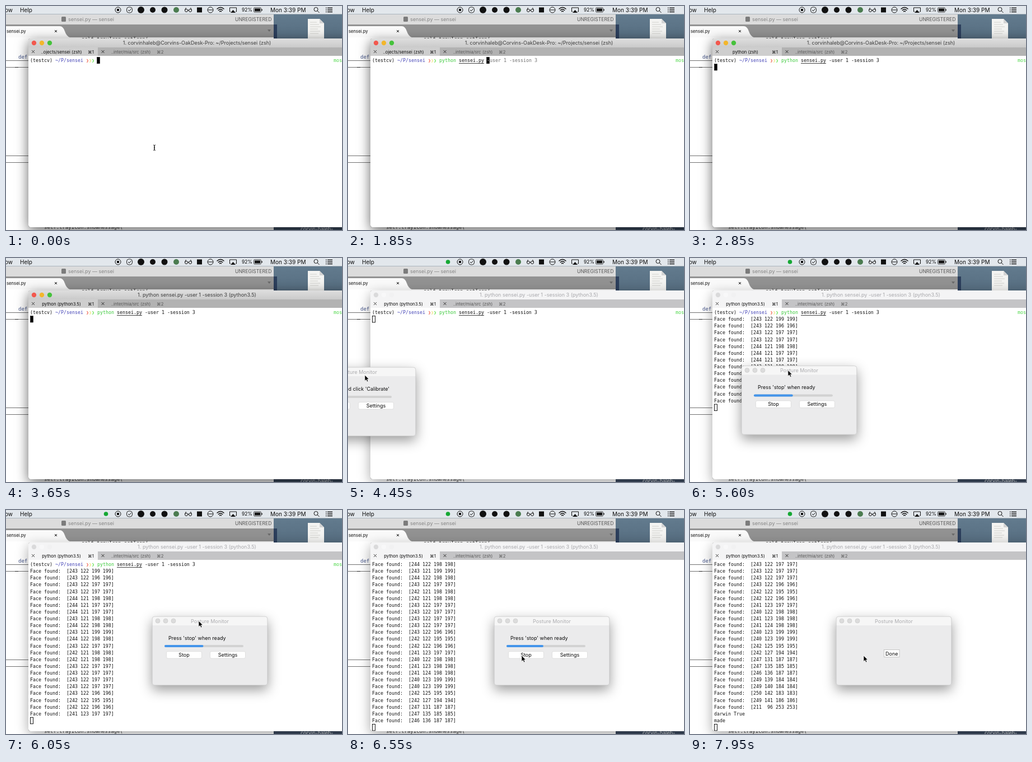
Write an HTML page that moves like this. It is 600 by 400 pixels and loops after 8000 ms.

```html
<!DOCTYPE html>
<html lang="en">
<head>
<meta charset="utf-8">
<title>Terminal session</title>
<style>
html, body { margin: 0; width: 100%; height: 100%; overflow: hidden; }
svg { display: block; width: 600px; height: 400px; }
text { font-family: Inter, "DejaVu Sans", sans-serif; font-size: 9px; fill: #0c0c0c; white-space: pre; }
.mono { font-family: "DejaVu Sans Mono", monospace; font-size: 8.3px; fill: #141414; }
.code { font-family: "DejaVu Sans Mono", monospace; font-size: 9px; fill: #3c3c3c; }
.menu { font-size: 10px; }
.tab { font-size: 7.7px; }
.mid { text-anchor: middle; }
.line { fill: none; stroke: #111; }
</style>
</head>
<body>
<svg viewBox="0 0 600 400">
  <defs>
    <linearGradient id="bar" x2="0" y2="1">
      <stop stop-color="#dedede"/><stop offset="1" stop-color="#cacaca"/>
    </linearGradient>
    <linearGradient id="sky" x2="0" y2="1">
      <stop stop-color="#667f92"/><stop offset="1" stop-color="#566d80"/>
    </linearGradient>
  </defs>

  <rect width="600" height="60" fill="url(#sky)"/>
  <rect x="478" y="33" width="6" height="27" fill="#2c3f5c"/>
  <rect x="478" y="360" width="122" height="40" fill="#3c4b60"/>
  <path d="M539 23h21l8 8v40h-29z" fill="#f4f4f2"/>
  <path d="M560 23v8h8" fill="#d4d4d4"/>
  <path d="M543 29h12M543 33h16M543 37h19M543 41h14M543 45h18M543 49h15" stroke="#d0d0cc"/>
  <text x="555" y="401" class="mid" style="fill:#f0f0f0">corvin-haleb-</text>

  <g id="editor">
    <rect y="15" width="478" height="385" fill="#fff"/>
    <rect y="15" width="478" height="18" fill="#dcdcdc"/>
    <rect y="33" width="478" height="23" fill="#929292"/>
    <path d="M0 36H96Q102 36 105 45T114 56H0z" fill="#fafafa"/>
    <rect x="99" y="19" width="8" height="9" rx="1.5" fill="#7c7c7c"/>
    <text x="111" y="27" style="fill:#858585">sensei.py — sensei</text>
    <text x="409" y="27" style="font-size:8.6px;fill:#555">UNREGISTERED</text>
    <text x="1" y="48" class="tab">sensei.py</text>
    <path d="M87 43l4 4m0-4l-4 4" class="line"/>
    <path d="M467 42h6l-3 4z" fill="#6a6a6a"/>
    <text x="22" y="94" class="code" style="fill:#445488">def</text>
    <path d="M0 97.5H60M0 109.5H60M0 267.5H60M0 279.5H60" stroke="#707070"/>
    <path d="M16 109.5h6" stroke="#222"/>
    <text x="135" y="62" class="code">self.trayIcon.setIcon(</text>
    <text x="68" y="398" class="code">self.trayIcon.showMessage(</text>
  </g>

  <rect id="termShadow" x="40" y="58" width="580" height="337" rx="4"/>
  <g id="terminal">
    <rect x="40" y="58" width="580" height="337" rx="4" fill="#fff"/>
    <path id="titleBar" d="M40 74V62q0-4 4-4H600V74z"/>
    <rect id="tabRow" x="40" y="74" width="560" height="15"/>
    <rect id="activeTab" x="40" y="74" width="124" height="15"/>
    <g id="lights">
      <circle cx="50" cy="66" r="4.2" fill="#f2584e"/>
      <circle cx="64" cy="66" r="4.2" fill="#f3b62c"/>
      <circle cx="78" cy="66" r="4.2" fill="#46c23c"/>
    </g>
    <text id="termTitle" x="341" y="69" class="mid"></text>
    <path d="M46 79l5 5m0-5l-5 5M170.5 79l5 5m0-5l-5 5" class="line" stroke-width=".8"/>
    <text id="tabTitle" x="99" y="84.5" class="tab mid"></text>
    <text x="146" y="84.5" class="tab">⌘1</text>
    <text x="223" y="84.5" class="tab mid" style="fill:#555">..inter/mia/src (zsh)</text>
    <text x="269" y="84.5" class="tab" style="fill:#555">⌘2</text>

    <g id="prompt">
      <text x="43" y="100" class="mono">(testcv)</text>
      <text x="88" y="100" class="mono" style="fill:#4848b8">~/P/sensei</text>
      <text x="143" y="100" class="mono" style="fill:#f0604c">❯</text>
      <text x="148" y="100" class="mono" style="fill:#f0e47c">❯</text>
      <text x="153" y="100" class="mono" style="fill:#5ce04a">❯</text>
      <text x="585" y="100" class="mono" style="fill:#4fd84a">mos</text>
      <text id="word" x="163" y="100" class="mono"></text>
      <text id="args" x="193" y="100" class="mono"></text>
      <text id="hint" y="100" class="mono" style="fill:#707070"></text>
      <path id="underline" d="M198 102.5h45" stroke="#141414" stroke-width=".8"/>
    </g>
    <g id="rows"></g>
    <rect id="caret" width="5" height="11.5" stroke="#000"/>
    <text id="caretChar" y="100" class="mono" style="fill:#fff"></text>
  </g>

  <g id="dialog">
    <rect width="206" height="123" rx="4" fill="#ebebec" style="filter:drop-shadow(0 8px 11px rgba(0,0,0,.4))"/>
    <path d="M0 16V4q0-4 4-4H202q4 0 4 4V16z" fill="#f6f6f6"/>
    <rect x=".2" y=".2" width="205.6" height="122.6" rx="4" fill="none" stroke="#bcbcbc" stroke-width=".6"/>
    <g fill="#dcdcdc" stroke="#c6c6c6" stroke-width=".6">
      <circle cx="10" cy="8" r="4"/><circle cx="24" cy="8" r="4"/><circle cx="38" cy="8" r="4"/>
    </g>
    <text x="103" y="11.5" class="mid" style="fill:#adadb0">Posture Monitor</text>
    <g id="controls">
      <text id="label" x="29" y="42"></text>
      <rect x="22" y="51" width="141" height="4" rx="2" fill="#d2d2d2"/>
      <rect id="progress" x="22" y="51" height="4" rx="2" fill="#4495ea"/>
      <g fill="#fff" stroke="#d0d0d0" stroke-width=".6">
        <rect x="25.5" y="62.5" width="63" height="12.5" rx="2.5"/>
        <rect x="103.5" y="62.5" width="63" height="12.5" rx="2.5"/>
      </g>
      <text id="action" x="57" y="72" class="mid"></text>
      <text x="135" y="72" class="mid">Settings</text>
    </g>
    <g id="done">
      <rect x="85.5" y="59.5" width="27.5" height="13" fill="#fff" stroke="#bbb" stroke-width=".8"/>
      <text x="99.3" y="69.5" class="mid">Done</text>
    </g>
  </g>

  <g id="menuBar">
    <rect width="600" height="14.5" fill="#e2e7ec"/>
    <path d="M0 14.5H600" stroke="#b4bac0" stroke-width=".6"/>
    <text x="12" y="10.5" class="menu" text-anchor="end">Window</text>
    <text x="25" y="10.5" class="menu">Help</text>
    <circle id="camera" cx="178.5" cy="7" r="3.8" fill="#16a834"/>
    <g class="line">
      <circle cx="200" cy="7" r="5"/>
      <rect x="215.5" y="2" width="10" height="10" rx="4" stroke-width=".9"/>
      <path d="M218 7l2 2 3.5-4"/>
      <circle cx="322" cy="8" r="2.5"/><circle cx="329" cy="8" r="2.5"/>
      <path d="M324.5 7.5h2M319.5 7l2-4M331.5 7l-2-4"/>
      <circle cx="365" cy="7" r="5"/><path d="M360.5 7h9"/>
      <path d="M376.5 5.5q6.5-6 13 0M378.8 8q4.2-4 8.4 0M381 10.2q2-2 4 0" stroke-width="1.4"/>
      <path d="M401 10h-1.5V3h12v7H410"/>
      <rect x="442.5" y="3" width="13" height="8" rx="1.5" stroke-width=".8"/>
      <circle cx="553.5" cy="6" r="3.5"/><path d="M556 8.5l3.5 3.5"/>
      <path d="M574 3.5h9M574 7h9M574 10.5h9M571 3.5h1.5M571 7h1.5M571 10.5h1.5" stroke-width="1.3"/>
    </g>
    <g fill="#111">
      <rect x="198" y="5" width="4" height="4"/>
      <circle cx="241" cy="7" r="6"/>
      <circle cx="262" cy="7" r="5"/>
      <circle cx="283" cy="7" r="5.5"/>
      <circle cx="304" cy="7" r="5" fill="#4b7c50"/>
      <rect x="341" y="2.5" width="9" height="9"/>
      <path d="M405.5 7l4.5 5h-9z"/>
      <rect x="444" y="4.5" width="10" height="5"/><rect x="456.5" y="5.5" width="1.3" height="3"/>
    </g>
    <text x="421" y="10" style="font-size:8.5px">92%</text>
    <text x="472" y="10.5" class="menu">Mon 3:39 PM</text>
  </g>

  <path id="beam" d="M263 248q2 0 2 2v6q0 2-2 2M267 248q-2 0-2 2v6q0 2 2 2M264 253h2" class="line" stroke-width=".9"/>
  <path id="mouse" d="M0 0V10.5L2.5 8.3 4.2 12 6 11.2 4.4 7.6H7.5z" fill="#000" stroke="#fff" stroke-width=".7"/>
</svg>

<script>
const LOOP = 8000, ROWS = 25, PITCH = 12.13, CHAR = 5;
const COMMAND = "python sensei.py -user 1 -session 3";
const AT = { type: 350, accept: 2200, enter: 2700, python: 3150, window: 4000,
  calibrate: 4850, faces: 4925, stop: 6800, warning: 7750 };

// x, y and size of each face found while calibrating
const FACES = `243 122 199,243 122 196,243 122 197,243 122 197,244 121 198,244 121 197,244 121 197,243 121 198,
244 122 198,243 121 199,244 122 198,243 122 197,242 121 198,242 121 198,243 122 197,243 122 197,243 122 197,
243 122 197,243 122 196,242 122 195,242 122 196,241 123 197,240 122 198,241 123 198,241 124 198,240 123 199,
240 123 199,242 125 195,242 127 194,247 131 187,247 135 185,246 136 187,249 139 184,249 140 184,250 142 183,
249 141 186`.split(",").map(s => s.trim());
const size = face => face.slice(-3);
const report = face => `Face found:  [${face} ${size(face)}]`;
const LINES = FACES.map(report);
const WARNING = [report("211  96 253"), "darwin True", "made"];

// time, x, y
const MOUSE = [[4100, 265, 253], [4450, 30, 209], [4700, -30, 262], [4900, -30, 262],
  [5150, -2, 203], [5200, -2, 203], [5990, 344, 198], [6080, 344, 198], [6450, 310, 260]];
const DIALOG = [[5200, -85, 195], [5990, 261, 190]];

const el = {};
document.querySelectorAll("[id]").forEach(e => el[e.id] = e);
const show = (e, on) => e.style.display = on ? "" : "none";
const write = (e, s) => { if (e.textContent !== s) e.textContent = s; };
const set = (e, attrs) => { for (const k in attrs) e.setAttribute(k, attrs[k]); };
const move = (e, [x, y]) => set(e, { transform: `translate(${x} ${y})` });
const clamp = (v, lo, hi) => Math.min(hi, Math.max(lo, v));

function along(path, t) {
  const i = path.findIndex(p => p[0] > t);
  if (i === 0) return path[0].slice(1);
  if (i < 0) return path[path.length - 1].slice(1);
  const [a, b] = [path[i - 1], path[i]];
  const u = (t - a[0]) / (b[0] - a[0]), e = u * u * (3 - 2 * u);
  return [1, 2].map(k => a[k] + (b[k] - a[k]) * e);
}

const rows = Array.from({ length: ROWS }, (_, i) => {
  const row = document.createElementNS("http://www.w3.org/2000/svg", "text");
  set(row, { class: "mono", x: 43, y: 100 + i * PITCH });
  return el.rows.appendChild(row);
});

function drawTerminal(t, front) {
  write(el.tabTitle, t < AT.enter ? "..ojects/sensei (zsh)" : t < AT.python ? "python (zsh)" : "python (python3.5)");
  write(el.termTitle, t < AT.python ? "1. corvinhaleb@Corvins-OakDesk-Pro: ~/Projects/sensei (zsh)"
    : "1. python sensei.py -user 1 -session 3 (python3.5)");
  el.termTitle.style.fill = front ? "#3c3c3c" : "#a8a8ac";
  set(el.titleBar, { fill: front ? "url(#bar)" : "#f4f4f5" });
  set(el.tabRow, { fill: front ? "#b2b2b2" : "#c4c4c6" });
  set(el.activeTab, { fill: front ? "#cecece" : "#f4f4f5" });
  el.lights.style.filter = front ? "" : "grayscale(1) brightness(1.5) opacity(.4)";
  el.termShadow.style.filter = `drop-shadow(0 6px 11px rgba(0,0,0,${front ? .6 : .35}))`;
}

function drawCommand(t) {
  const typed = t >= AT.accept ? COMMAND.length : clamp(Math.floor((t - AT.type) / 85), 0, 17);
  write(el.word, COMMAND.slice(0, Math.min(6, typed)));
  el.word.style.fill = typed < 6 ? "#e0503c" : "#3cc93c";
  write(el.args, COMMAND.slice(6, Math.max(6, typed)));
  write(el.hint, typed ? COMMAND.slice(typed + 1) : "");
  set(el.hint, { x: 163 + CHAR * (typed + 1) });
  show(el.underline, typed >= 16);
  return typed;
}

function drawOutput(t, typed, front) {
  const count = clamp(Math.floor((t - AT.faces) / 50), 0, FACES.length);
  const out = LINES.slice(0, count);
  if (t >= AT.warning) out.push(...WARNING);
  const entered = t >= AT.enter;
  const scroll = Math.max(0, out.length + 2 - ROWS);
  rows.forEach((row, i) => write(row, out[i + scroll - 1] || ""));
  show(el.prompt, !scroll);
  const caretRow = entered ? out.length + 1 - scroll : 0;
  set(el.caret, {
    x: entered ? 43.5 : 162.5 + CHAR * typed,
    y: 91.3 + caretRow * PITCH,
    fill: front ? "#000" : "none",
    "stroke-width": front ? .5 : .9
  });
  write(el.caretChar, typed && !entered ? COMMAND.charAt(typed) : "");
  set(el.caretChar, { x: 163 + CHAR * typed });
  return count;
}

function drawDialog(t, count) {
  const started = t >= AT.calibrate, stopped = t >= AT.stop;
  show(el.dialog, t >= AT.window);
  move(el.dialog, along(DIALOG, t));
  show(el.controls, !stopped);
  show(el.done, stopped);
  write(el.label, started ? "Press 'stop' when ready" : "Sit upright and click 'Calibrate'");
  write(el.action, started ? "Stop" : "Calibrate");
  set(el.progress, { width: count ? 141 * size(FACES[count - 1]) / 400 : 0 });
}

function draw(t) {
  const front = t < AT.window;
  drawTerminal(t, front);
  const count = drawOutput(t, drawCommand(t), front);
  drawDialog(t, count);
  show(el.camera, !front);
  show(el.beam, t < AT.type);
  show(el.mouse, t >= MOUSE[0][0]);
  move(el.mouse, along(MOUSE, t));
}

const start = performance.now();
function tick() {
  draw((performance.now() - start) % LOOP);
  requestAnimationFrame(tick);
}
tick();
</script>
</body>
</html>
```
